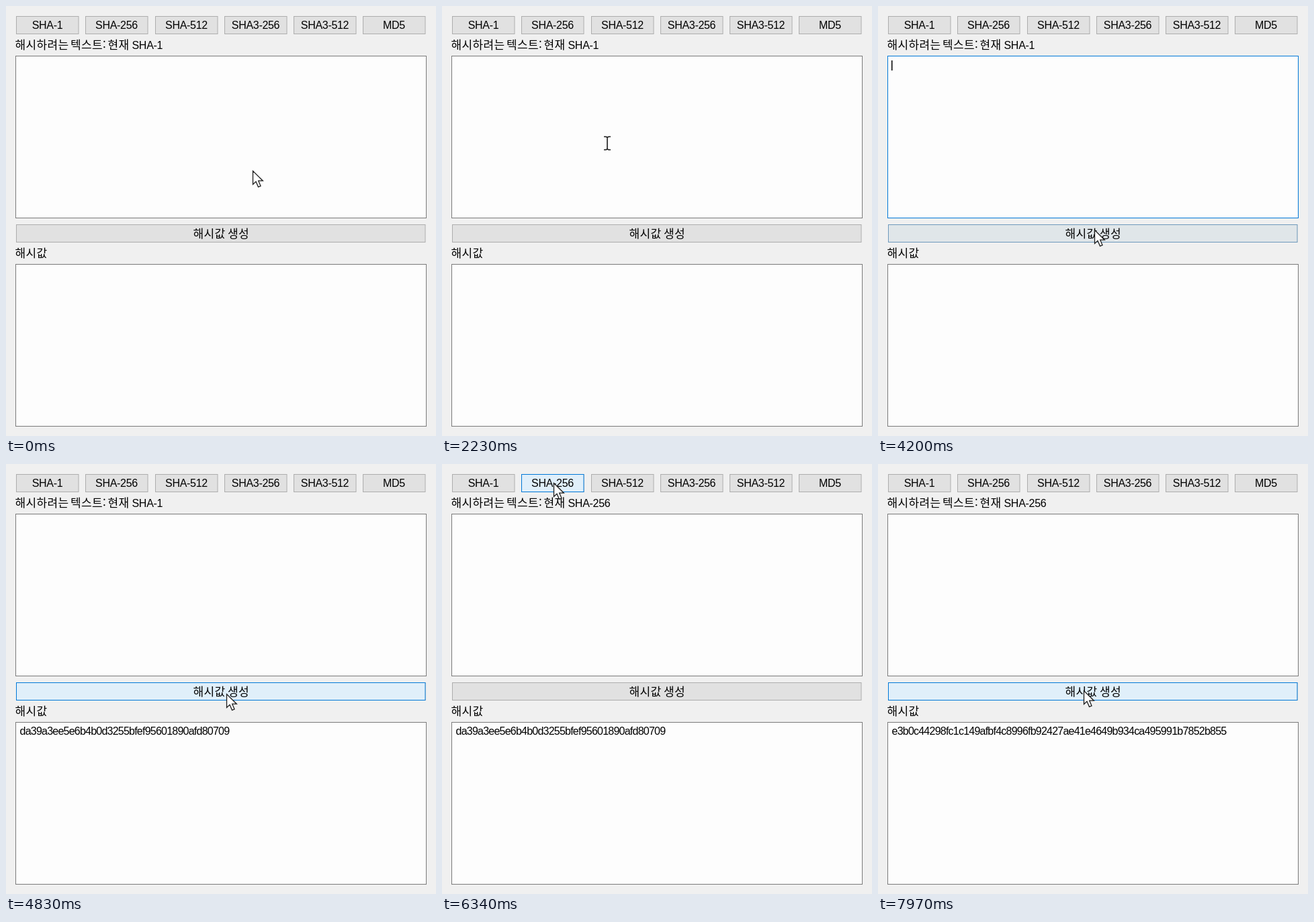
Write an HTML page that moves like this. It is 640 px wide and 640 px high and loops after 8 s.

```html
<!DOCTYPE html>
<html lang="ko">
<head>
<meta charset="utf-8">
<title>Hash maker</title>
<style>
  html, body { margin: 0; width: 100%; height: 100%; overflow: hidden; background: #f0f0f0; }
  svg { display: block; width: 100%; height: 100%; }
  text { font: 16px "Liberation Sans", Arial, sans-serif; letter-spacing: -.3px; fill: #000; }
  .ko { font: 17px "Noto Sans CJK KR", "Noto Sans CJK", sans-serif; letter-spacing: .35px; }
  .hash { letter-spacing: -.77px; }
  .mid { text-anchor: middle; }
  .face { fill: #e1e1e1; stroke: #adadad; }
  .hover { fill: #e0effa; stroke: #0078d7; }
  .press { fill: #cce4f7; stroke: #005499; }
  .box { fill: #fdfdfd; stroke: #7a7a7a; }
  .focus { stroke: #0078d7; }
  #arrow path { fill: #fff; stroke: #1c1c1c; stroke-width: 1.3; }
  #beam path { fill: none; stroke: #1c1c1c; stroke-width: 1.6; }
</style>
</head>
<body>
<svg id="stage" viewBox="0 0 640 640">
  <rect width="640" height="640" fill="#f0f0f0"/>
  <g id="buttons"></g>
  <text class="ko" x="13.5" y="64">해시하려는</text>
  <text class="ko" x="96" y="64">텍스트:</text>
  <text class="ko" x="151.5" y="64">현재</text>
  <text id="mode" x="187.5" y="64"></text>
  <rect class="box" id="input" x="14.5" y="74.5" width="611" height="241"/>
  <rect id="caret" x="20" y="81" width="1.5" height="15"/>
  <text class="ko" x="13.5" y="374">해시값</text>
  <rect class="box" x="14.5" y="384.5" width="611" height="241"/>
  <text id="hash" class="hash" x="20.5" y="403"></text>
  <g id="arrow"><path d="M.5 .5V20.5L5 16.3L8.5 24.3L12 22.8L8.7 15.2H15.3Z"/></g>
  <g id="beam"><path d="M-5-9.500H-2L0-8.500L2-9.500H5M0-8.500V9M-5 10H-2L0 9L2 10H5"/></g>
</svg>
<script>
const LOOP = 8000, FADE = 200;
const $ = id => document.getElementById(id);
const clamp = v => Math.max(0, Math.min(1, v));
const within = (t, spans) => spans.some(([a, b]) => t >= a && t < b);

const EMPTY_SHA1 = "da39a3ee5e6b4b0d3255bfef95601890afd80709";
const EMPTY_SHA256 = "e3b0c44298fc1c149afbf4c8996fb92427ae41e4649b934ca495991b7852b855";

// Pointer stops: time, x, y
const path = [
  [0, 367, 245], [840, 642, 520],
  [1190, 320, -26], [2230, 246, 204], [3050, 190, 140],
  [4130, 318, 326], [4200, 322, 333], [4540, 324, 339], [4820, 328, 342],
  [5320, 350, 369], [5600, 176, 50], [5760, 162, 29], [6750, 174, 28],
  [7040, 262, 36], [7200, 269, 120], [7560, 306, 335], [8000, 306, 337]
];

// Time spans in which each button is hovered or pressed
const buttons = [
  { label: "SHA-1", x: 15 },
  { label: "SHA-256", x: 118, hover: [[5640, 6870]], press: [[5900, 5990]] },
  { label: "SHA-512", x: 222, hover: [[6910, 7090]] },
  { label: "SHA3-256", x: 325 },
  { label: "SHA3-512", x: 428 },
  { label: "MD5", x: 531 },
  { x: 15, y: 325, w: 609, hover: [[4130, 5030]], press: [[4540, 4640]] }
];
buttons[6].hover.push([7530, 8400]);
buttons[6].press.push([7700, 7790]);

function add(tag, attrs, words) {
  const el = document.createElementNS("http://www.w3.org/2000/svg", tag);
  for (const k in attrs) el.setAttribute(k, attrs[k]);
  if (words) el.textContent = words;
  $("buttons").append(el);
  return el;
}

for (const b of buttons) {
  const { x, y = 15, w = 93 } = b;
  const layer = name => add("rect", { class: name, x: x + .5, y: y + .5, width: w - .5, height: 26 });
  layer("face");
  b.glow = layer("hover");
  b.down = layer("press");
  if (b.label) {
    add("text", { class: "mid", x: x + w / 2, y: 34 }, b.label);
  } else {
    add("text", { class: "ko", x: 278.5, y: 344.5 }, "해시값");
    add("text", { class: "ko", x: 330, y: 344.5 }, "생성");
  }
}

function glowAt(t, spans = []) {
  return Math.max(0, ...spans.map(([a, b]) =>
    Math.min(clamp((t - a) / FADE), 1 - clamp((t - b) / FADE))));
}

// Speed along one axis at a stop; zero where the direction turns
function speed(i, axis) {
  const slope = j => (path[j + 1][axis] - path[j][axis]) / (path[j + 1][0] - path[j][0]);
  if (i === 0 || i === path.length - 1) return 0;
  const a = slope(i - 1), b = slope(i);
  return a * b > 0 ? 2 * a * b / (a + b) : 0;
}

function pointerAt(t) {
  let i = 0;
  while (i < path.length - 2 && t >= path[i + 1][0]) i++;
  const p = path[i], q = path[i + 1], d = q[0] - p[0], u = (t - p[0]) / d, v = 1 - u;
  return [1, 2].map(k =>
    v * v * (1 + 2 * u) * p[k] + u * u * (3 - 2 * u) * q[k] +
    u * v * d * (v * speed(i, k) - u * speed(i + 1, k)));
}

function show(el, on) { el.style.display = on ? "" : "none"; }

function draw(t) {
  for (const b of buttons) {
    b.glow.style.opacity = glowAt(t, b.hover);
    show(b.down, within(t, b.press || []));
  }

  const focused = within(t, [[3050, 4540]]);
  $("input").classList.toggle("focus", focused);
  show($("caret"), focused && (t - 3050) % 1060 < 530);

  $("mode").textContent = t < 5990 ? "SHA-1" : "SHA-256";
  $("hash").textContent = t < 4640 ? "" : t < 7790 ? EMPTY_SHA1 : EMPTY_SHA256;

  const [x, y] = pointerAt(t);
  const seen = !within(t, [[840, 1190]]);
  const inBox = x > 14 && x < 626 && (y > 74 && y < 316 || y > 384 && y < 626);
  const beam = inBox && t > 1000;
  const place = `translate(${Math.round(x)} ${Math.round(y)})`;
  $("arrow").setAttribute("transform", place);
  $("beam").setAttribute("transform", place);
  show($("arrow"), seen && !beam);
  show($("beam"), seen && beam);
}

const start = performance.now();
function tick() {
  draw((performance.now() - start) % LOOP);
  requestAnimationFrame(tick);
}
tick();
</script>
</body>
</html>
```
